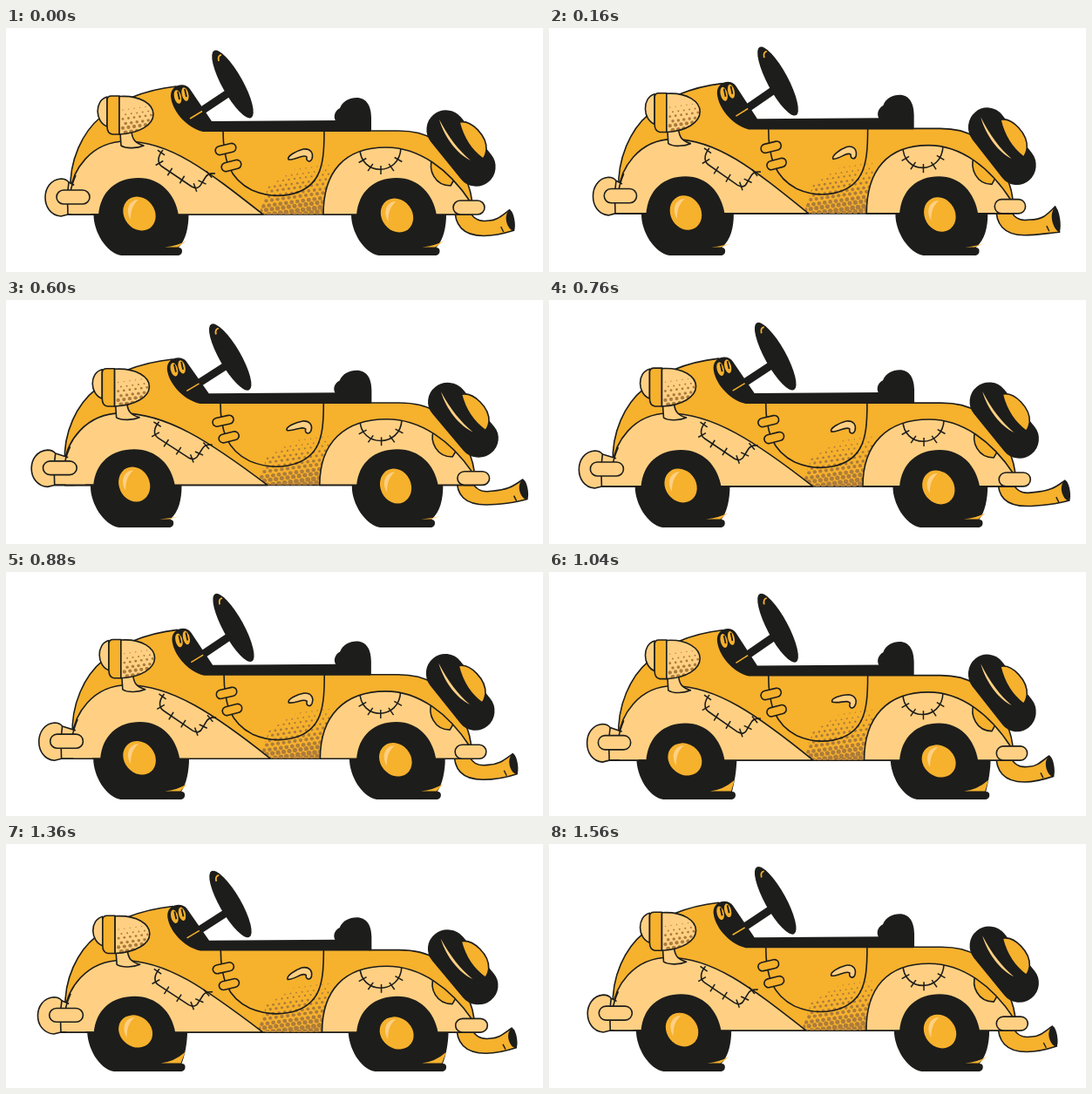
Write an HTML page with a canvas that moves like this. It is 616 px wide and 280 px high and loops after 1.6 s.

```html
<!DOCTYPE html>
<html lang="en">
<head>
<meta charset="utf-8">
<title>Bouncing car</title>
<style>
  html, body { margin: 0; width: 100%; height: 100%; overflow: hidden; background: #fff; }
  canvas { display: block; }
</style>
</head>
<body>
<canvas id="stage" width="616" height="280"></canvas>
<script>
const ctx = document.getElementById('stage').getContext('2d');
const ORANGE = '#f6b12d', CREAM = '#ffd083', INK = '#1d1d1b', DOT = '#ad7c3b';
const LOOP = 1600, STEP = 40, GROUND = 261;

// Sine that eases to rest at every zero and every peak
const easedSine = a => Math.sin(a) * Math.abs(Math.sin(a));

function bump(t, mid, half) {
  const d = Math.abs(t - mid) / half;
  return d < 1 ? Math.cos(d * Math.PI / 2) ** 2 : 0;
}

function fill(d, color) {
  ctx.fillStyle = color;
  ctx.fill(new Path2D(d));
}

function line(d, width = 1.6, color = INK) {
  ctx.strokeStyle = color;
  ctx.lineWidth = width;
  ctx.stroke(new Path2D(d));
}

function shape(d, color) {
  fill(d, color);
  line(d);
}

function oval(x, y, rx, ry, deg, color) {
  ctx.beginPath();
  ctx.ellipse(x, y, rx, ry, deg * Math.PI / 180, 0, 7);
  ctx.fillStyle = color;
  ctx.fill();
}

function pill(x, y, w, h, deg, color) {
  ctx.save();
  ctx.translate(x, y);
  ctx.rotate(deg * Math.PI / 180);
  ctx.beginPath();
  ctx.roundRect(-w / 2, -h / 2, w, h, h / 2);
  ctx.fillStyle = color;
  ctx.fill();
  ctx.strokeStyle = INK;
  ctx.lineWidth = 1.6;
  ctx.stroke();
  ctx.restore();
}

function clipped(d, draw) {
  ctx.save();
  ctx.clip(new Path2D(d));
  draw();
  ctx.restore();
}

// Slightly tilted rows of dots that grow downwards
function halftone(x0, y0, cols, rows, gap, maxRadius) {
  for (let j = 0; j < rows; j++) {
    for (let i = 0; i < cols; i++) {
      const x = x0 + (i + j % 2 / 2) * gap;
      const y = y0 + j * gap * 0.8 - i * 0.9;
      const r = maxRadius * Math.min(1, 0.25 + j / rows);
      oval(x, y, r, r, 0, DOT);
    }
  }
}

function stitches(list) {
  for (const [x, y, deg] of list) {
    const a = deg * Math.PI / 180, dx = 5 * Math.cos(a), dy = 5 * Math.sin(a);
    line(`M${x - dx},${y - dy}L${x + dx},${y + dy}`, 1.5);
  }
}

function tire(cx, lift, sway) {
  const w = 54.5 - 4.5 * lift, lip = cx + 47 - 11.5 * lift + 2 * sway;
  const left = cx - 23 + 6 * lift, rise = Math.max(3, 7 - 8 * lift);
  fill(`M${cx - w},214 C${cx - w},234 ${left - 17},${GROUND - 3} ${left},${GROUND}
    L${lip - 4},${GROUND} q4,-1 4,-5 t-4,-4
    C${cx + w - 3},243 ${cx + w},228 ${cx + w},214
    C${cx + w},185 ${cx - w},185 ${cx - w},214z`, INK);
  fill(`M${cx + 27},251.5 Q${cx + 42},250 ${cx + w - 2.5},${251 - rise}
    L${lip - 5},251.5z`, ORANGE);
}

function hub(x, y, lift) {
  ctx.save();
  ctx.translate(x, y - 3 * lift);
  oval(0, 0, 20.5, 17.5, 52 + 24 * lift, ORANGE);
  fill('M-10,7 C-17,-5 -11,-16 -1,-16 C-8,-10 -10,-3 -10,7z', CREAM);
  ctx.restore();
}

function pipe(t) {
  const out = 7 * bump(t, 160, 200) + 16 * bump(t, 700, 300);
  const flare = 3 * bump(t, 160, 200), up = 2 * bump(t, 700, 300);
  const x = 576 + out, y = 221 - up;
  shape(`M515,205 C514,226 524,${238.5 - up} 548,${238.5 - up}
    C560,${238.5 - up} ${x - 6},${y + 15} ${x + 6},${y + 11 + flare}
    L${x + 1},${y - 12 - flare} C${x - 9},${y - 5} ${x - 14},${y} 554,221
    C542,223 534,219 530,205z`, ORANGE);
  fill(`M${x + 1},${y - 12 - flare} C${x + 6},${y - 12} ${x + 9},${y + 8} ${x + 6},${y + 11 + flare}
    C${x},${y + 13} ${x - 8},${y - 5} ${x + 1},${y - 12 - flare}z`, INK);
  line(`M${x - 9},${y + 7} l3,6`, 1.4);
}

function headlight() {
  shape('M131,120 L132,135 C138,139 151,138 158,135 C149,132 145,129 144,119z', CREAM);
  shape('M116,79 C101,83 102,108 116,113z', CREAM);
  shape('M121,78 H130 V122 H122 Q116,121 116,113 V83 Q116,78 121,78z', ORANGE);
  const lens = 'M130,78.5 C155,77 169,88 169,99 C169,111 153,121 130,122z';
  fill(lens, CREAM);
  clipped(lens, () => halftone(134, 94, 6, 7, 6.5, 2.6));
  line(lens);
}

function steering() {
  line('M211,104 L256,74', 9);
  line('M211,104 L225,95.5', 1.5, ORANGE);
  oval(260, 64.5, 44, 12, 61, INK);
  line('M244,38 c-1,-4 0,-7 3,-7', 1.8, ORANGE);
}

function door(t) {
  line('M249,118 C249,150 256,173 282,186 C310,198 344,193 357,170 C364,157 365,140 365,118');
  pill(252, 139, 24, 10, -13, ORANGE);
  pill(258.5, 158, 23, 10, -14, ORANGE);
  const turn = 12 * (bump(t, 440, 260) + bump(t, 1040, 260))
    - 6 * (bump(t, 160, 160) + bump(t, 1360, 160));
  ctx.save();
  ctx.translate(338, 146);
  ctx.rotate(turn * Math.PI / 180);
  shape('M-14,5 C-16,1 -5,-5 3,-7 C11,-8 15,-3 13,4 C11,9 6,7 7,2 C3,-2 -6,6 -14,5z', CREAM);
  ctx.restore();
}

function frontFender(sway) {
  const end = 295 + 8 * sway;
  shape(`M74,214 V188 C76,165 96,130 138,130 C188,130 ${end - 65},163 ${end},214z`, CREAM);
  line('M180,140 C174,147 173,155 179,159 L213,182 Q221,186 224,179 L229,171 Q232,166 240,167');
  stitches([[178, 143, 35], [176, 155, -30], [188, 165, -58], [202, 174, -58],
    [217, 183, 70], [225, 177, 25], [233, 168, 50]]);
}

function rearFender(sway) {
  const start = 364 - 4 * sway;
  const d = `M${start},214 C${start},165 388,137 436,137
    C474,137 508,162 533,200 L535,214z`;
  fill(d, CREAM);
  clipped(d, () => {
    shape('M489,150 C484,163 492,181 510,181 L522,160z', ORANGE);
    line('M406,138 C406,170 452,171 453,137');
  });
  line(d);
  stitches([[409, 152, -30], [418, 160, -55], [430, 163, 90], [442, 160, 55], [450, 151, 30]]);
}

function spareWheel() {
  pill(522, 138, 98, 43, 51, INK);
  shape('M520,108 C534,105 552,124 551,140 Q550,147 547,150 C536,142 525,128 520,108z', ORANGE);
  fill('M497,105 C503,126 518,145 533,152 C519,140 508,126 497,105z', CREAM);
}

function bumpers(sway) {
  const x = 45 - 10 * sway;
  shape(`M85,184 L${x + 27},177 Q${x + 24},173 ${x + 18},173 C${x - 6},175 ${x - 6},214 ${x + 18},216 L${x + 26},214 H85z`, CREAM);
  line(`M${x + 27},177 Q${x + 25},190 ${x + 26},214`);
  fill('M75,214 V189 C77,183 79,178 82,172 L97,172 V214z', CREAM);
  line(`M74,188 C75,182 77,176 80,169 M${x + 26},214 H106`);
  pill(x + 32, 194, 38, 16, 0, CREAM);
  pill(531 + 3 * sway, 206, 36, 16, 0, CREAM);
}

function carBody(t, sway) {
  pipe(t);
  shape(`M74,214 V188 C72,152 88,119 109,102 C122,86 158,71 195,67 L236,110 H380
    L418,118 H450 C488,118 500,133 515,154 C528,171 536,187 535,214z`, ORANGE);
  clipped('M290,214 L301,182 L340,157 H372 V214z', () => halftone(292, 168, 13, 12, 6.5, 2.8));
  fill('M189,78 C189,64 206,62 211,70 L236,107 L380,106 L418,117 V119 H226 C206,114 190,94 189,78z', INK);
  fill('M380,109 C374,103 377,95 383,92 C386,84 394,80 402,80 C414,80 419,90 419,103 V118 H380z', INK);
  oval(197, 79, 4, 8, -14, ORANGE);
  oval(205.5, 76, 3.8, 8, -14, ORANGE);
  line('M197,73 l2,9 M205,70 l2,9', 1.8);
  door(t);
  frontFender(sway);
  rearFender(sway);
  headlight();
  steering();
  bumpers(sway);
  spareWheel();
  for (const x of [152, 448]) {
    fill(`M${x - 46},215 C${x - 44},187 ${x - 25},172 ${x},172 C${x + 25},172 ${x + 42},190 ${x + 46},215z`, INK);
  }
}

function draw(t) {
  const phase = 2 * Math.PI * t / LOOP;
  const stretch = easedSine(2 * phase);
  const lift = easedSine(phase);
  const sway = (1 - Math.cos(phase)) / 2;
  const frontX = 155 + 4.5 * stretch - 1.5 * sway, rearX = 450.5 - 1.7 * sway;

  ctx.fillStyle = '#fff';
  ctx.fillRect(0, 0, 616, 280);
  ctx.lineJoin = 'round';
  tire(frontX, lift, sway);
  tire(rearX, lift, sway);

  ctx.save();
  ctx.translate(400, 214 - 3.2 * lift);
  ctx.scale(1 - 0.02 * stretch, 1 + 0.0175 * stretch);
  ctx.translate(-400, -214);
  carBody(t, sway);
  ctx.restore();

  hub(frontX - 2, 213, lift);
  hub(rearX - 2, 215, lift);
}

function tick() {
  draw(Math.floor(performance.now() % LOOP / STEP) * STEP);
  requestAnimationFrame(tick);
}
tick();
</script>
</body>
</html>
```
